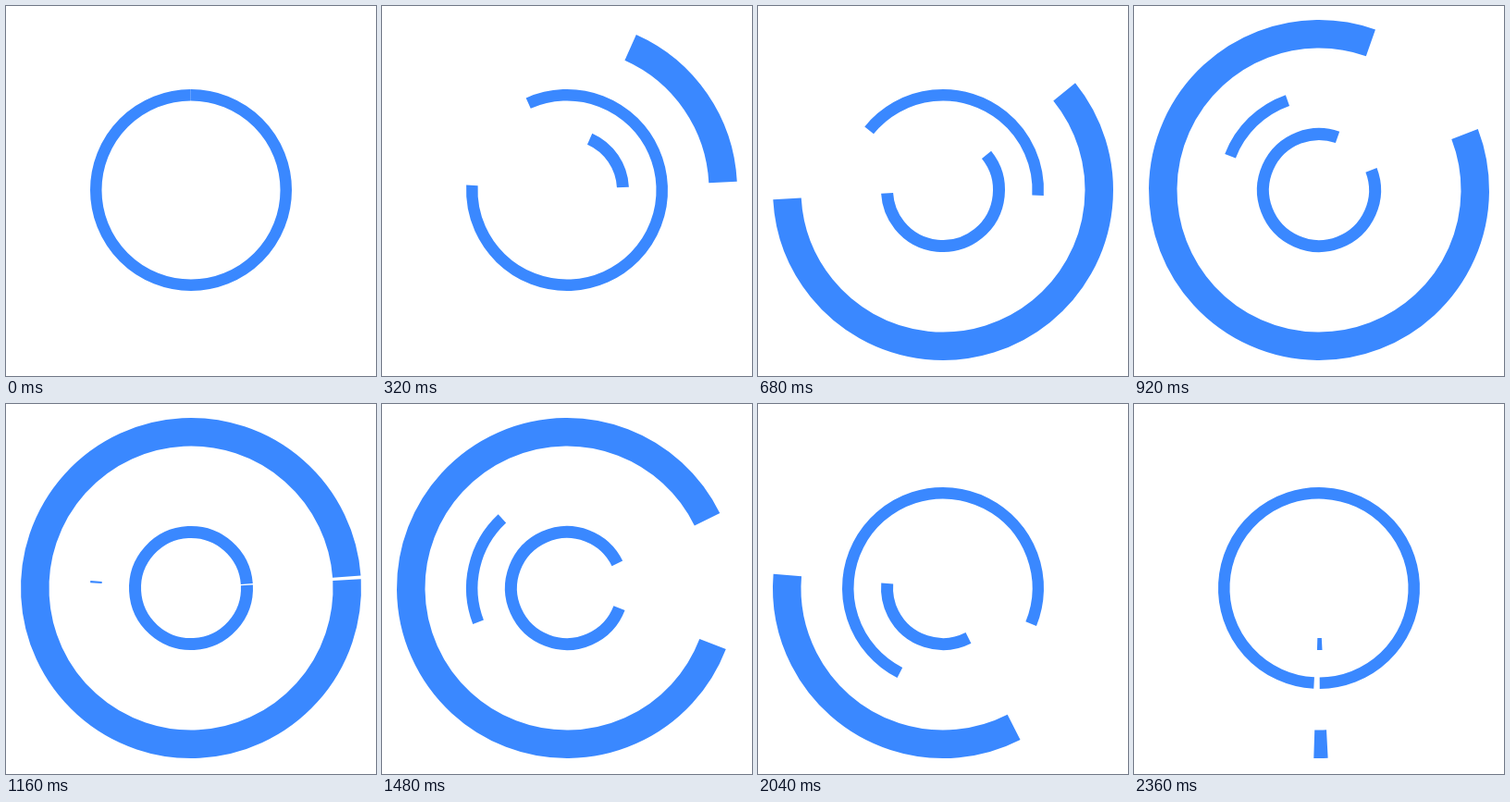
Write an HTML page with a canvas that moves like this. It is 400x400 px and loops after 2400 ms.

```html
<!DOCTYPE html>
<html>
<head>
<meta charset="utf-8">
<style>
  html, body { margin: 0; width: 100%; height: 100%; overflow: hidden; background: #fff; }
  canvas { display: block; }
</style>
</head>
<body>
<canvas id="stage" width="400" height="400"></canvas>
<script>
const ctx = document.getElementById('stage').getContext('2d');
const LOOP = 2400, HALF = LOOP / 2, STEP = 40;

// Ease curve with flat ends; x1 and x2 are the handle lengths.
function ease(x, x1, x2) {
  if (x <= 0) return 0;
  if (x >= 1) return 1;
  let lo = 0, hi = 1, s;
  for (let i = 0; i < 30; i++) {
    s = (lo + hi) / 2;
    const q = 1 - s;
    if (3 * q * q * s * x1 + 3 * q * s * s * x2 + s * s * s < x) lo = s;
    else hi = s;
  }
  return s * s * (3 - 2 * s);
}

function arc(radius, width, start, length) {
  if (length <= 0) return;
  const rad = Math.PI / 180;
  ctx.lineWidth = width;
  ctx.beginPath();
  ctx.arc(200, 199, radius, start * rad, (start + length) * rad);
  ctx.stroke();
}

function draw(t) {
  const tail = -90 + 180 * t / LOOP;
  const back = t - HALF;
  const grow = 360 * ease(t / HALF, 1 / 3, 2 / 3);
  const sweep = back < 0 ? grow : 360 * (1 - ease(back / 1187, 0.28, 0.926));
  const gap = back < 0 ? grow : 360 * (1 - ease(back / HALF, 1 / 6, 5 / 6));

  ctx.fillStyle = '#fff';
  ctx.fillRect(0, 0, 400, 400);
  ctx.strokeStyle = '#3a88ff';
  arc(168.75, 30.5, tail, sweep);
  arc(60.5, 13, tail, sweep);
  // The middle ring is the mirrored complement.
  arc(102.75, 12.5, 180 - tail, 360 - gap);
}

const begin = performance.now();
function tick() {
  const t = (performance.now() - begin) % LOOP;
  draw(Math.floor(t / STEP) * STEP);
  requestAnimationFrame(tick);
}
tick();
</script>
</body>
</html>
```
